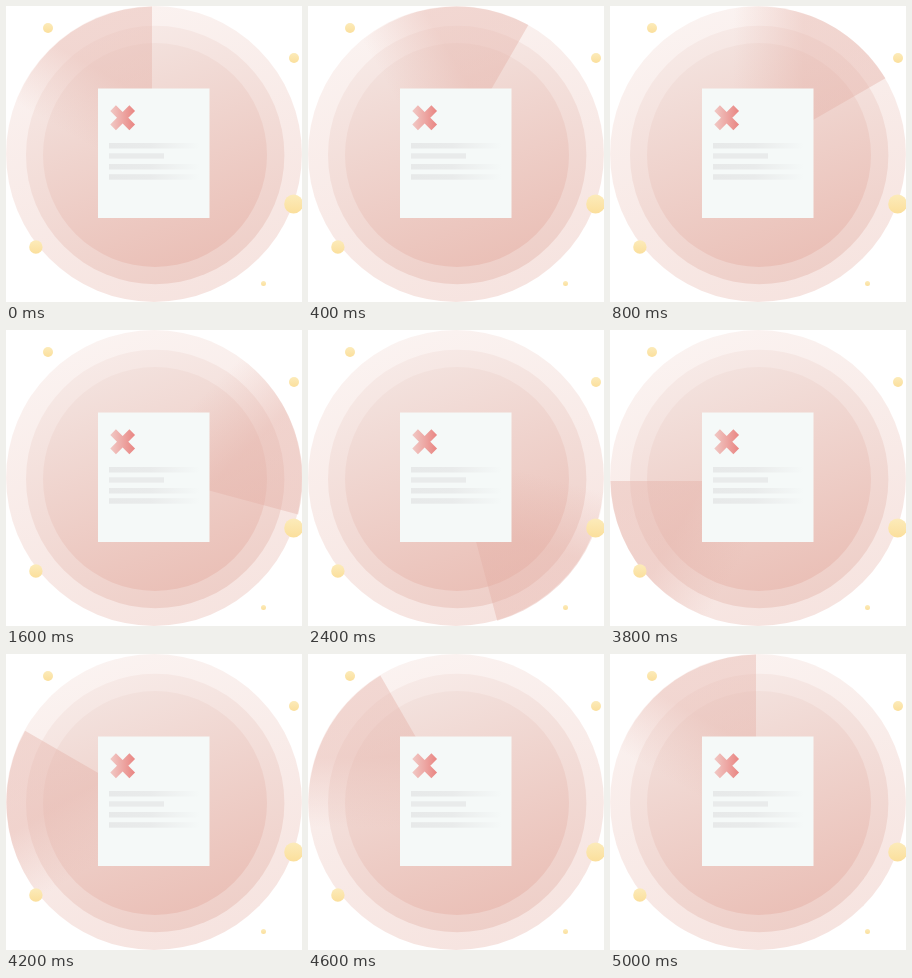
An HTML page for the animation above (5200 ms loop, 296 px wide and 296 px high).

```html
<!DOCTYPE html>
<html lang="en">
<head>
<meta charset="utf-8">
<title>Scan failed</title>
<style>
  html, body { margin: 0; width: 100%; height: 100%; overflow: hidden; background: #fff; }
  svg { display: block; width: 100%; height: 100%; overflow: hidden; }
</style>
</head>
<body>
<svg viewBox="0 0 296 296">
  <defs>
    <linearGradient id="outer" x1=".32" y1="0" x2=".68" y2="1">
      <stop stop-color="#fbf3f1"/><stop offset="1" stop-color="#f6e3df"/>
    </linearGradient>
    <linearGradient id="middle" x1=".32" y1="0" x2=".68" y2="1">
      <stop stop-color="#f7eae7"/><stop offset="1" stop-color="#eecec7"/>
    </linearGradient>
    <linearGradient id="inner" x1=".32" y1="0" x2=".68" y2="1">
      <stop stop-color="#f3e2de"/><stop offset="1" stop-color="#eabfb6"/>
    </linearGradient>
    <linearGradient id="beam" gradientUnits="userSpaceOnUse" x1="-12.5" y1="21.6" x2="22.5" y2="-39">
      <stop stop-color="#e4aea4" stop-opacity="0"/><stop offset="1" stop-color="#e4aea4" stop-opacity=".4"/>
    </linearGradient>
    <linearGradient id="cross" gradientUnits="userSpaceOnUse" x1="104" y1="0" x2="129" y2="0">
      <stop stop-color="#f1cac6"/><stop offset="1" stop-color="#e98582"/>
    </linearGradient>
    <linearGradient id="fade">
      <stop stop-color="#e7e9e9"/><stop offset=".45" stop-color="#e9ebeb"/>
      <stop offset="1" stop-color="#f5f9f8"/>
    </linearGradient>
    <linearGradient id="gold" x2="0" y2="1">
      <stop stop-color="#fcebba"/><stop offset="1" stop-color="#fbdf9c"/>
    </linearGradient>
  </defs>

  <circle cx="148" cy="148" r="147.9" fill="url(#outer)"/>
  <circle cx="149.2" cy="149" r="129.2" fill="url(#middle)"/>
  <circle cx="149" cy="149" r="112" fill="url(#inner)"/>

  <!-- Quarter sector whose leading edge sits just behind the pivot -->
  <path id="sweep" fill="url(#beam)" d="M-2.5 0V-148A148 148 0 0 0 -148 0z"/>

  <path fill="#f5f9f8" d="M92 82.5h111.5V212H92z"/>
  <path stroke="url(#cross)" stroke-width="8" d="M107.1 102.2l19.1 19.1m0-19.1l-19.1 19.1"/>
  <g fill="url(#fade)">
    <rect x="103" y="137" width="91" height="5.5"/>
    <rect x="103" y="147.3" width="55" height="5.3" fill="#e9ebeb"/>
    <rect x="103" y="158" width="91" height="5.5"/>
    <rect x="103" y="168.2" width="91" height="5.5"/>
  </g>
  <g fill="url(#gold)">
    <circle cx="42" cy="22" r="5"/>
    <circle cx="288" cy="52" r="5"/>
    <circle cx="287.6" cy="198" r="9.4"/>
    <circle cx="29.9" cy="241" r="6.7"/>
    <circle cx="257.5" cy="277.5" r="2.5"/>
  </g>
</svg>
<script>
  const LOOP = 5200, TICK = 200, HOLD = 4, STEP_DEG = 15;
  const sweep = document.getElementById('sweep');

  function draw(now) {
    const tick = Math.floor(now % LOOP / TICK);
    // The sweep rests for one extra tick after its fourth step
    const step = tick > HOLD ? tick - 1 : tick;
    sweep.setAttribute('transform', `translate(148.5 148.5) rotate(${step * STEP_DEG})`);
  }

  let start;
  function loop(now) {
    start ??= now;
    draw(now - start);
    requestAnimationFrame(loop);
  }
  draw(0);
  requestAnimationFrame(loop);
</script>
</body>
</html>
```
